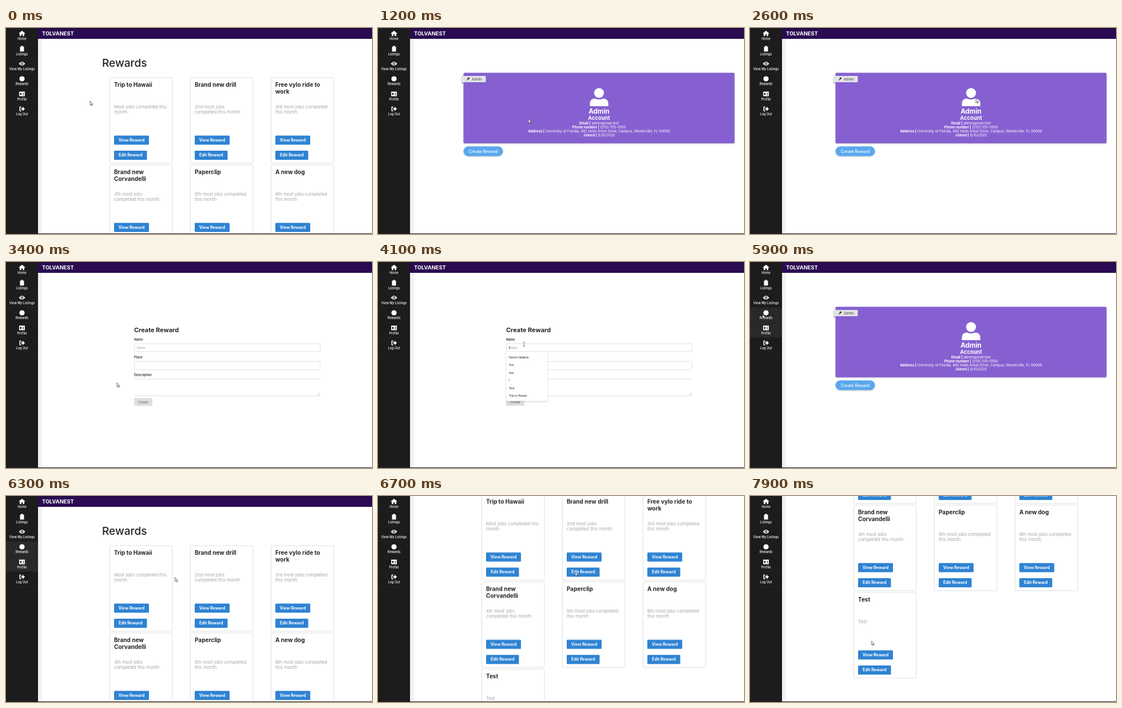
Recreate the animation shown at these times as an HTML page. Size 640 px wide and 361 px high, loop 8000 ms.

```html
<!DOCTYPE html>
<html lang="en">
<head>
<meta charset="utf-8">
<title>Rewards dashboard</title>
<style>
html, body { margin: 0; width: 100%; height: 100%; overflow: hidden; background: #fff; }
svg { display: block; width: 100vw; height: 100vh; font-family: Inter, "Open Sans", sans-serif; }
.b { font-weight: 700; }
.m { text-anchor: middle; }
.w { fill: #fff; }
.nav text { font-size: 5.5px; font-weight: 500; }
.h1 { font-size: 19px; font-weight: 500; fill: #222; }
.title { font-size: 10px; font-weight: 650; fill: #262626; }
.desc { font-size: 7.9px; font-weight: 300; fill: #8c8c8c; }
.btn { font-size: 7.2px; font-weight: 700; fill: #fff; }
.info { font-size: 6.1px; fill: #fff; }
.field { fill: #fff; stroke: #dadada; stroke-width: .8; }
.label { font-size: 5.5px; font-weight: 600; fill: #333; }
.menu text { font: 5.1px "Liberation Sans", Arial, sans-serif; fill: #222; }

#view, #rewards, #profile, #form, #menu, #arrow, #beam, .hot { animation: 8s step-end infinite; }
#view { animation-name: scroll; }
#rewards { animation-name: rewards; }
#profile { animation-name: profile; }
#form { animation-name: form; }
#menu { animation-name: menu; }
#beam { animation-name: beam; }
#arrow { animation-name: arrow; }
#hot3 { animation-name: hot3; }
#hot4 { animation-name: hot4; }
#cursor { animation: move 8s infinite; }

@keyframes rewards { 0% { opacity: 1 } 11.25% { opacity: 0 } 77.5%, 100% { opacity: 1 } }
@keyframes profile {
  0% { opacity: 0 } 11.25% { opacity: 1 } 41.25% { opacity: 0 }
  56.25% { opacity: 1 } 77.5%, 100% { opacity: 0 }
}
@keyframes form { 0% { opacity: 0 } 41.25% { opacity: 1 } 56.25%, 100% { opacity: 0 } }
@keyframes menu { 0% { opacity: 0 } 50% { opacity: 1 } 56.25%, 100% { opacity: 0 } }
@keyframes beam { 0% { opacity: 0 } 50% { opacity: 1 } 56.25%, 100% { opacity: 0 } }
@keyframes arrow { 0% { opacity: 1 } 50% { opacity: 0 } 56.25%, 100% { opacity: 1 } }
@keyframes hot3 { 0% { opacity: 0 } 70% { opacity: 1 } 80%, 100% { opacity: 0 } }
@keyframes hot4 {
  0% { opacity: 0 } 3.75% { opacity: 1 } 12.5% { opacity: 0 }
  67.5% { opacity: 1 } 80%, 100% { opacity: 0 }
}
@keyframes scroll {
  0% { transform: translateY(0) }
  81.25% { transform: translateY(0); animation-timing-function: steps(5) }
  87.5%, 100% { transform: translateY(-224px) }
}
/* the pointer advances ten times a second */
@keyframes move {
  0% { transform: translate(147px, 128px); animation-timing-function: steps(4) }
  5% { transform: translate(26px, 117px) }
  10% { transform: translate(26px, 117px); animation-timing-function: steps(4) }
  15% { transform: translate(263px, 159.5px); animation-timing-function: steps(5) }
  21.25% { transform: translate(200px, 212px); animation-timing-function: steps(9) }
  32.5% { transform: translate(395px, 124px); animation-timing-function: steps(6) }
  40% { transform: translate(190px, 213px); animation-timing-function: steps(3) }
  43.75% { transform: translate(196px, 211px); animation-timing-function: steps(5) }
  50% { transform: translate(255px, 144px) }
  51.25% { transform: translate(255px, 144px); animation-timing-function: steps(3) }
  55% { transform: translate(252px, 147px); animation-timing-function: steps(4) }
  60% { transform: translate(214px, 167.5px); animation-timing-function: steps(5) }
  66.25% { transform: translate(52px, 112px); animation-timing-function: steps(4) }
  71.25% { transform: translate(22px, 92px) }
  76.25% { transform: translate(22px, 92px); animation-timing-function: steps(2) }
  78.75% { transform: translate(295.5px, 142.5px); animation-timing-function: steps(7) }
  87.5% { transform: translate(382px, 126px); animation-timing-function: steps(9) }
  98.75%, 100% { transform: translate(212.5px, 254px) }
}
</style>
</head>
<body>
<svg viewBox="0 0 640 361" preserveAspectRatio="none">
  <defs>
    <filter id="soft" x="-10%" y="-10%" width="120%" height="125%">
      <feDropShadow dx="0" dy="1" stdDeviation="1.2" flood-opacity=".25"/>
    </filter>
  </defs>
  <rect width="640" height="361" fill="#fff"/>
  <rect x="56" width="7" height="361" fill="#f2f2f2"/>

  <g id="view">
    <rect x="56" width="584" height="19" fill="#2a0b52"/>
    <rect x="56" width="584" height="1" fill="#14062a"/>
    <text class="b w" x="63" y="12.8" font-size="9.3">TOLVANEST</text>

    <g id="rewards">
      <text class="h1" x="168" y="68">Rewards</text>
      <g id="cards"></g>
    </g>

    <g id="profile">
      <rect x="149.5" y="78.5" width="474" height="123.5" rx="2" fill="#8660d1" filter="url(#soft)"/>
      <path d="M145 95H149.5V99.5Z" fill="#b5b5bb"/>
      <rect x="145" y="84" width="43.5" height="11" rx="1" fill="#e4e3e8"/>
      <path d="M155.3 91.5L158 88.8" stroke="#333" stroke-width="1.2"/>
      <circle cx="158.4" cy="88.2" r="1.6" fill="#333"/>
      <text x="164" y="91.7" font-size="5.9" fill="#444">Admin</text>
      <circle class="w" cx="386.5" cy="113.8" r="8.6"/>
      <path class="w" d="M370.5 137V132.5Q370.5 124.5 378.5 123.5Q386.5 127 394.5 123.5Q402.7 124.5 402.7 132.5V137Z"/>
      <text class="b w m" x="386.5" y="150.3" font-size="11.6">Admin</text>
      <text class="b w m" x="386.5" y="161.4" font-size="9.3">Account</text>
      <g id="info"></g>
      <rect x="149.5" y="207.5" width="69" height="17" rx="8.5" fill="#5aa8ed" filter="url(#soft)"/>
      <text class="w m" x="184" y="218.5" font-size="7.2" font-weight="500">Create Reward</text>
    </g>

    <g id="form">
      <text class="b" x="224" y="122.8" font-size="10.9" fill="#262626">Create Reward</text>
      <text class="label" x="224" y="138">Name</text>
      <rect class="field" x="224.4" y="143" width="325" height="14" rx="1.5"/>
      <text x="229" y="152" font-size="5.3" fill="#999">Name</text>
      <text class="label" x="224" y="169">Place</text>
      <rect class="field" x="224.4" y="174.4" width="325" height="14.4" rx="1.5"/>
      <text class="label" x="224" y="200">Description</text>
      <path d="M224 205H549.5M224 234.5H549.5" stroke="#dadada" stroke-width=".8"/>
      <path d="M544.5 233.5L548.5 229.5M547 233.5L548.5 232" stroke="#888" stroke-width=".6"/>
      <rect x="224" y="238.5" width="32" height="13.5" rx="1" fill="#dedede"/>
      <text class="m" x="240" y="247.5" font-size="5.5" fill="#666">Create</text>
      <g id="menu" class="menu">
        <path d="M229.5 147V153" stroke="#222" stroke-width=".6"/>
        <rect x="224" y="157.5" width="72" height="86" fill="#fff" filter="url(#soft)"/>
      </g>
    </g>
  </g>

  <g class="nav">
    <rect width="56" height="361" fill="#1c1c1c"/>
    <g id="nav"></g>
  </g>
  <rect y="360" width="640" height="1" fill="#222"/>

  <g id="cursor">
    <path id="arrow" d="M0 0V7.2L1.7 5.7L2.8 8.2L3.9 7.7L2.8 5.3H5Z" fill="#fff" stroke="#333" stroke-width=".7"/>
    <path id="beam" d="M-1.3-3.5H1.3M0-3.5V3.5M-1.3 3.5H1.3" fill="none" stroke="#444" stroke-width=".7"/>
  </g>
</svg>
<script>
const put = (id, html) => document.getElementById(id).insertAdjacentHTML('beforeend', html);

const lines = (cls, x, y, step, text) => text.split('/')
  .map((s, i) => `<text class="${cls}" x="${x}" y="${y + i * step}">${s}</text>`).join('');

const button = (x, y, w, text) =>
  `<rect x="${x}" y="${y}" width="${w}" height="16" rx="1.5" fill="#2e83d3"/>
   <text class="btn m" x="${x + w / 2}" y="${y + 10.2}">${text}</text>`;

const card = ([title, desc], i) => {
  const x = 181 + i % 3 * 141, y = 87 + Math.floor(i / 3) * 153;
  return `<rect x="${x + .4}" y="${y}" width="109.6" height="150" rx="2.5" fill="#fff" stroke="#dcdcdc" stroke-width=".9"/>`
    + lines('title', x + 8, y + 15.7, 12, title)
    + lines('desc', x + 8, y + 53.8, 9.2, desc)
    + button(x + 8, y + 101.5, 61, 'View Reward')
    + button(x + 8, y + 128, 57.5, 'Edit Reward');
};

put('cards', [
  ['Trip to Hawaii', 'Most jobs completed this/month'],
  ['Brand new drill', '2nd most jobs/completed this month'],
  ['Free vylo ride to/work', '3rd most jobs completed/this month'],
  ['Brand new/Corvandelli', '4th most jobs/completed this month'],
  ['Paperclip', '5th most jobs completed/this month'],
  ['A new dog', '6th most jobs completed/this month'],
  ['Test', 'Test']
].map(card).join(''));

put('info', [
  ['Email', 'admin@mail.test'],
  ['Phone number', '(555) 555-0100'],
  ['Address', 'University of Florida, 482 Holm Arbor Drive, Campus, Wexlerville, FL 00000'],
  ['Joined', '8/10/2020']
].map(([key, value], i) =>
  `<text class="info m" x="386.5" y="${169.1 + i * 7.1}"><tspan class="b">${key} |</tspan> ${value}</text>`).join(''));

put('menu', ['Norvin Haldeck', 'Axo', 'test', 't', 'Test', 'Trip to Hawaii']
  .map((s, i) => `<text x="229" y="${169 + i * 13.4}">${s}</text>`).join(''));

put('nav', [
  ['Home', 'M0-5L6 0H4V4.5H1.3V1.5H-1.3V4.5H-4V0H-6Z'],
  ['Listings', 'M-3.5-3.5H-1.5V-5H1.5V-3.5H3.5V5H-3.5Z'],
  ['View My Listings', 'M-5.5 0Q0-7 5.5 0Q0 7-5.5 0ZM-2.3 0a2.3 2.3 0 1 0 4.6 0a2.3 2.3 0 1 0-4.6 0ZM-1.2 0a1.2 1.2 0 1 0 2.4 0a1.2 1.2 0 1 0-2.4 0Z'],
  ['Rewards', 'M-4.6 0a4.6 4.6 0 1 0 9.2 0a4.6 4.6 0 1 0-9.2 0Z'],
  ['Profile', 'M-5-3.8H5V4H-5ZM-3.5-1.5H-.8V1.8H-3.5ZM1-1.2H3.8V-.2H1ZM1 1H3.8V2H1Z'],
  ['Log Out', 'M-4.5-4H-1V-2.6H-3V2.6H-1V4H-4.5ZM-1.5-1.3H1V-4L5 0L1 4V1.3H-1.5Z']
].map(([name, icon], i) => {
  const y = 9.8 + i * 26.4;
  const hot = i === 3 || i === 4
    ? `<rect id="hot${i}" class="hot" y="${y - 9}" width="56" height="26" fill="#292929"/>` : '';
  return `${hot}<path d="M4 ${y + 17.2}H52" stroke="#272727" stroke-width=".6"/>
    <path class="w" fill-rule="evenodd" transform="translate(28 ${y})" d="${icon}"/>
    <text class="w m" x="28" y="${y + 11.4}">${name}</text>`;
}).join(''));
</script>
</body>
</html>
```
